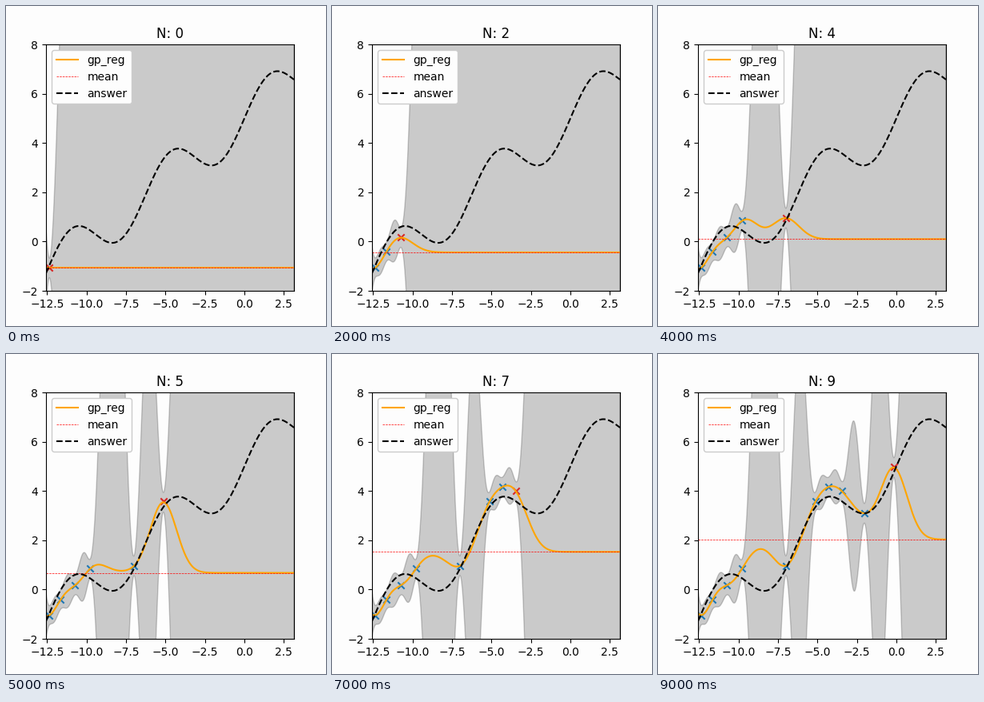
These frames come from a looping animation (400 px wide and 400 px high, 10000 ms). A matplotlib script:

```python
import numpy as np
import matplotlib.pyplot as plt
from matplotlib.animation import FuncAnimation

# Key points: the noisy samples, one more seen at each step
SAMPLES = [(-12.35, -1.07), (-11.65, -0.41), (-10.73, 0.16), (-9.77, 0.85),
           (-7.0, 0.96), (-5.13, 3.57), (-4.31, 4.17), (-3.45, 4.0),
           (-2.03, 3.1), (-0.16, 4.98)]
X, Y = np.array(SAMPLES).T

SCALE = 10.0     # kernel variance
WIDTH = 1.4      # kernel width
NOISE = 0.1
PAPER = "#fdfdfd"

grid = np.linspace(-4 * np.pi, np.pi, 600)
truth = np.sin(grid) + 0.5 * grid + 5


def kernel(a, b):
    return SCALE * np.exp(-(a[:, None] - b[None, :]) ** 2 / WIDTH)


def regress(x, y):
    """Posterior mean and variance on the grid, around the data mean."""
    prior = y.mean()
    cov = kernel(x, x) + NOISE * np.eye(len(x))
    cross = kernel(grid, x)
    mu = prior + cross @ np.linalg.solve(cov, y - prior)
    var = SCALE + NOISE - np.sum(cross * np.linalg.solve(cov, cross.T).T, axis=1)
    return prior, mu, var


fig, ax = plt.subplots(figsize=(4, 4), dpi=100, facecolor=PAPER)


def draw(step):
    x, y = X[:step + 1], Y[:step + 1]
    prior, mu, var = regress(x, y)

    ax.clear()
    ax.set_facecolor(PAPER)
    ax.fill_between(grid, mu - 2 * var, mu + 2 * var, color="black", alpha=0.2)
    ax.scatter(x[:-1], y[:-1], marker="x", color="tab:blue")
    ax.scatter(x[-1:], y[-1:], marker="x", color="tab:red")
    ax.plot(grid, mu, color="orange", label="gp_reg")
    ax.plot(grid[[0, -1]], [prior, prior], "--", color="red", lw=0.5,
            label="mean")
    ax.plot(grid, truth, "--", color="black", label="answer")

    ax.set_xlim(grid[0], grid[-1])
    ax.set_ylim(-2, 8)
    ax.set_title(f"N: {step}")
    ax.legend(loc="upper left", facecolor=PAPER, framealpha=1)
    return ax.get_children()


anim = FuncAnimation(fig, draw, frames=len(X), init_func=lambda: draw(0),
                     interval=1000, repeat=True, repeat_delay=0, blit=False)
plt.show()
```
